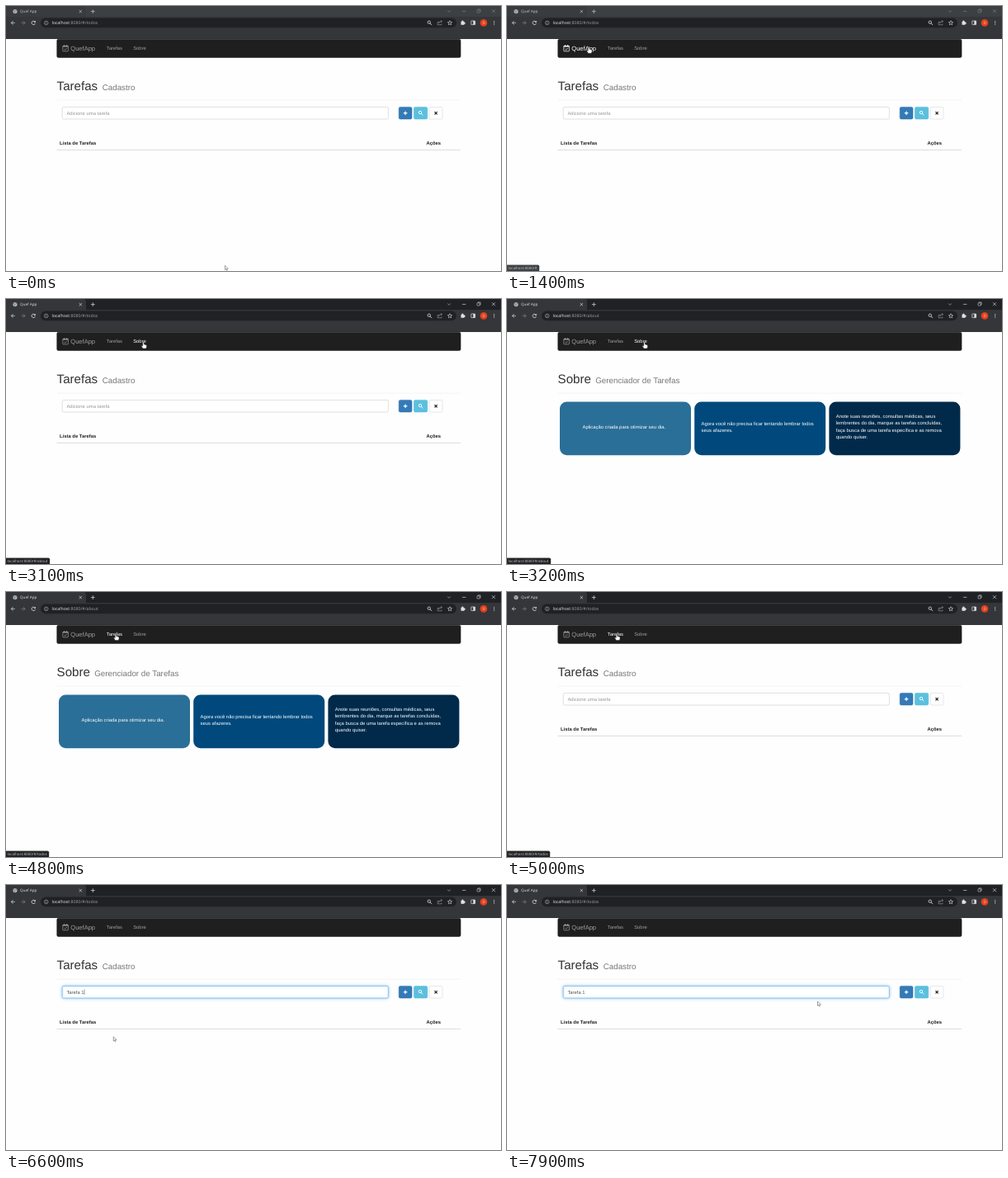
An HTML page with a canvas for the animation above (8000 ms loop, 600 px wide and 321 px high).

```html
<!DOCTYPE html>
<html lang="pt-BR">
<head>
<meta charset="utf-8">
<title>Quef App</title>
<style>
html, body { margin: 0; width: 100%; height: 100%; overflow: hidden; background: #fff; }
canvas { display: block; width: 600px; height: 321px; }
</style>
</head>
<body>
<canvas id="stage"></canvas>
<script>
const W = 600, H = 321, LOOP = 8000, STEP = 100;
const SANS = '"Liberation Sans", Arial, sans-serif';
const UI = '"Open Sans", "Noto Sans", sans-serif';
const BODY = 5.86;

const canvas = document.getElementById('stage');
const ratio = window.devicePixelRatio || 1;
canvas.width = Math.round(W * ratio);
canvas.height = Math.round(H * ratio);
const c = canvas.getContext('2d');
c.scale(ratio, ratio);
c.textRendering = 'geometricPrecision';

// Event times in ms
const FOCUS_WINDOW = 1600, OPEN_ABOUT = 3200, OPEN_TODOS = 5000;
const FOCUS_INPUT = 5630, OPEN_MENU = 5700, PICK = 6500;

// Pointer path: time, x, y
const PATH = [
  [0, 265.5, 314.3], [100, 265.5, 314.3], [500, 238, 240], [700, 238, 240],
  [1300, 99, 49.3], [1700, 99, 49.3], [2300, 166.5, 52], [3400, 166.5, 52],
  [4100, 133, 50.6], [5100, 133, 50.6], [5500, 108, 128], [5800, 108, 128],
  [6300, 121, 190], [6500, 121, 190], [6900, 180, 150], [7400, 376.5, 141], [8000, 376.5, 141]
];

const LINKS = [
  { x0: 62, x1: 115, url: 'localhost:8080/#', w: 39 },
  { x0: 116, x1: 147, url: 'localhost:8080/#/todos', w: 52 },
  { x0: 148, x1: 176, url: 'localhost:8080/#/about', w: 53 }
];
const MENU = ['2', '????', 'teste 2', 'Tarefa 1', 'Teste 2'];

const clamp = v => Math.max(0, Math.min(1, v));
const ease = v => v * v * (3 - 2 * v);

function pointerAt(t) {
  let i = 0;
  while (i < PATH.length - 2 && t >= PATH[i + 1][0]) i++;
  const [t0, x0, y0] = PATH[i], [t1, x1, y1] = PATH[i + 1];
  const k = ease(clamp((t - t0) / (t1 - t0)));
  return { x: x0 + (x1 - x0) * k, y: y0 + (y1 - y0) * k };
}

function rect(x, y, w, h, color) {
  c.fillStyle = color;
  c.fillRect(x, y, w, h);
}

function box(x, y, w, h, r, fill, stroke, lw = 0.5) {
  c.beginPath();
  c.roundRect(x, y, w, h, r);
  if (fill) { c.fillStyle = fill; c.fill(); }
  if (stroke) { c.strokeStyle = stroke; c.lineWidth = lw; c.stroke(); }
}

function text(s, x, y, size, color, family = SANS, weight = '') {
  c.font = `${weight} ${size}px ${family}`;
  c.fillStyle = color;
  c.fillText(s, x, y);
  return c.measureText(s).width;
}

function line(points, color, lw = 0.7) {
  c.beginPath();
  points.forEach(([x, y], i) => i ? c.lineTo(x, y) : c.moveTo(x, y));
  c.strokeStyle = color;
  c.lineWidth = lw;
  c.stroke();
}

function arc(x, y, r, color, lw = 0.7, a0 = 0, a1 = Math.PI * 2) {
  c.beginPath();
  c.arc(x, y, r, a0, a1);
  c.strokeStyle = color;
  c.lineWidth = lw;
  c.stroke();
}

function dot(x, y, r, color) {
  c.beginPath();
  c.arc(x, y, r, 0, Math.PI * 2);
  c.fillStyle = color;
  c.fill();
}

function cross(x, y, r, color, lw) {
  line([[x - r, y - r], [x + r, y + r]], color, lw);
  line([[x - r, y + r], [x + r, y - r]], color, lw);
}

function plus(x, y, r, color, lw) {
  line([[x - r, y], [x + r, y]], color, lw);
  line([[x, y - r], [x, y + r]], color, lw);
}

function lens(x, y, r, color, lw) {
  arc(x, y, r, color, lw);
  line([[x + r * 0.7, y + r * 0.7], [x + r * 2, y + r * 2]], color, lw);
}

function star(x, y, r, color) {
  const pts = [];
  for (let i = 0; i <= 10; i++) {
    const a = -Math.PI / 2 + i * Math.PI / 5, q = i % 2 ? r * 0.45 : r;
    pts.push([x + Math.cos(a) * q, y + Math.sin(a) * q]);
  }
  line(pts, color, 0.6);
}

function tabStrip(active) {
  rect(0, 0, W, 40, '#35363a');
  rect(0, 0, W, 13.2, active ? '#202124' : '#3c4043');
  box(-4, 0, 101, 16, [3, 3, 0, 0], active ? '#35363a' : '#393b3f');
  rect(0, 13.2, W, 14, '#35363a');

  const ink = active ? '#dfe1e5' : '#c4c7cb';
  const dim = active ? '#e8eaed' : '#85888c';
  dot(11, 6.6, 2.6, '#b4b7bb');
  line([[9, 5.6], [11, 6.4], [10.6, 8.6]], '#55585c', 0.6);
  line([[11.6, 4.5], [12.8, 6.2]], '#55585c', 0.6);
  text('Quef App', 17, 8.4, 4.6, ink, UI);
  cross(90.3, 6.6, 1.6, ink, 0.7);
  plus(105.3, 6.6, 2.4, ink, 0.7);

  line([[535.2, 5.6], [537, 7.3], [538.8, 5.6]], active ? '#bdc1c6' : dim, 0.6);
  line([[553, 6.4], [557.4, 6.4]], dim, 0.6);
  box(571, 4.8, 3.2, 3.2, 0.3, null, dim, 0.5);
  line([[572, 4.8], [572, 3.9], [575.1, 3.9], [575.1, 7], [574.2, 7]], dim, 0.5);
  cross(591, 6.2, 2, dim, 0.6);
}

function toolbar(path) {
  const ink = '#dfe1e5', dim = '#83868a';
  line([[10.8, 20.4], [6.4, 20.4]], ink);
  line([[8.6, 18.1], [6.3, 20.4], [8.6, 22.7]], ink);
  line([[18.6, 20.4], [23, 20.4]], dim);
  line([[20.8, 18.1], [23.1, 20.4], [20.8, 22.7]], dim);
  arc(33.3, 20.4, 2.2, ink, 0.8, 0.3, 5.4);
  c.beginPath();
  c.moveTo(35.8, 17.7); c.lineTo(35.8, 20); c.lineTo(33.5, 20);
  c.fillStyle = ink; c.fill();

  box(42, 14.6, 504, 11.6, 5.8, '#202124');
  arc(48.7, 20.4, 2.3, '#b6babf', 0.6);
  line([[48.7, 20.1], [48.7, 21.7]], '#b6babf', 0.6);
  dot(48.7, 19.2, 0.4, '#b6babf');
  const w = text('localhost', 55.4, 22.3, 5.2, '#e8eaed', UI);
  text(':8080/#/' + path, 55.4 + w, 22.3, 5.2, '#9aa0a6', UI);

  lens(512.8, 19.7, 1.7, ink, 0.8);
  line([[525, 19.4], [523.2, 19.4], [523.2, 22.8], [528, 22.8], [528, 21.6]], '#9da1a6', 0.6);
  line([[524.8, 21.2], [525.5, 19.2], [528.4, 18.6]], '#9da1a6', 0.6);
  line([[527, 17.2], [528.6, 18.6], [527, 20]], '#9da1a6', 0.6);
  star(538, 20.5, 2.8, ink);
  rect(551.5, 18.8, 4, 4, ink);
  dot(553.4, 18.4, 1, ink);
  dot(555.8, 20.7, 1, ink);
  box(563.8, 18, 4.8, 4.6, 0.4, null, ink, 0.7);
  rect(566.3, 18, 2.3, 4.6, ink);
  dot(579, 20.4, 4.3, '#e5401d');
  text('D', 577.4, 22.1, 4.5, '#f6dcd5', UI);
  for (const y of [18.6, 20.4, 22.2]) dot(591.7, y, 0.55, ink);
}

function calendar(color) {
  box(68.8, 48.4, 6.6, 6.4, 0.5, null, color, 0.7);
  rect(68.8, 48.2, 6.6, 1.3, color);
  line([[70.6, 47.1], [70.6, 49.2]], color, 0.9);
  line([[73.6, 47.1], [73.6, 49.2]], color, 0.9);
  line([[70.4, 52], [71.6, 53.2], [73.9, 50.8]], color, 0.8);
}

function navbar(hover) {
  const tint = i => hover === LINKS[i] ? '#fff' : '#9d9d9d';
  box(61.7, 40.2, 489.4, 22.3, 1.7, '#1f1f1f', '#0b0b0b', 0.4);
  calendar(tint(0));
  text('QuefApp', 78.3, 54, 7.54, tint(0));
  text('Tarefas', 121.8, 53.4, BODY, tint(1));
  text('Sobre', 154.2, 53.4, BODY, tint(2));
}

function heading(title, sub, subX) {
  text(title, 61.6, 102, 15.1, '#333');
  text(sub, subX, 102, 9.8, '#777');
  rect(61.5, 113.8, 489.5, 0.5, '#e9e9e9');
}

function input(t) {
  const glow = ease(clamp((t - FOCUS_INPUT) / 150));
  c.save();
  if (glow) {
    c.shadowColor = `rgba(102,175,233,${0.75 * glow})`;
    c.shadowBlur = 3.4 * ratio;
  }
  const mix = (a, b) => Math.round(a + (b - a) * glow);
  box(68.2, 122.4, 395.2, 14.6, 1.7, '#fff',
    `rgb(${mix(204, 102)},${mix(204, 175)},${mix(204, 233)})`, 0.6);
  c.restore();

  const filled = t >= PICK;
  const w = filled
    ? text('Tarefa 1', 73.4, 131.8, BODY, '#555')
    : text('Adicione uma tarefa', 73.4, 131.8, BODY, '#999');
  const blink = (t - OPEN_MENU + LOOP) % 1000 < 500;
  const caretOn = filled ? t < 7700 && (t < 6700 || t >= 7200) : blink;
  if (t >= FOCUS_INPUT && caretOn) rect(filled ? 73.6 + w : 73, 126.5, 0.5, 6.4, '#333');
}

function todosPage(t) {
  heading('Tarefas', 'Cadastro', 116.7);
  input(t);
  box(476.2, 122.4, 15.8, 14.6, 1.7, '#337ab7', '#2e6da4');
  plus(484.1, 129.7, 2.3, '#fff', 1.2);
  box(494.4, 122.4, 16.4, 14.6, 1.7, '#5bc0de', '#46b8da');
  lens(502, 129, 1.7, '#fff', 0.9);
  box(513.2, 122.4, 15.8, 14.6, 1.7, '#fff', '#ccc');
  cross(521.1, 129.8, 1.6, '#222', 1.2);
  text('Lista de Tarefas', 65, 168.4, BODY, '#222', SANS, 'bold');
  text('Ações', 509.5, 168.4, BODY, '#222', SANS, 'bold');
  rect(61.5, 173.8, 489.5, 0.9, '#d8d8d8');
}

function card(x, color, textX, baseline, lines) {
  box(x, 124.6, 159, 64.6, 8.4, color);
  lines.forEach((s, i) => text(s, textX, baseline + i * 8.45, BODY, '#fff'));
}

function aboutPage() {
  heading('Sobre', 'Gerenciador de Tarefas', 107.2);
  card(64, '#2a6f97', 91.5, 156.7, ['Aplicação criada para otimizar seu dia.']);
  card(227.2, '#01497c', 235.6, 152.5,
    ['Agora você não precisa ficar tentando lembrar todos', 'seus afazeres.']);
  card(390.4, '#012a4a', 398.8, 144, [
    'Anote suas reuniões, consultas médicas, seus',
    'lembrentes do dia, marque as tarefas concluídas,',
    'faça busca de uma tarefa específica e as remova',
    'quando quiser.'
  ]);
}

function menu(p) {
  box(106.8, 140.6, 33, 73.6, 1.6, '#292a2d');
  c.beginPath();
  c.moveTo(112, 140.8); c.lineTo(115.3, 137.4); c.lineTo(118.6, 140.8);
  c.fill();
  MENU.forEach((s, i) => {
    const y = 142.5 + i * 14;
    if (p.y >= y && p.y < y + 14) rect(106.8, y, 33, 14, '#45464a');
    text(s, 111, y + 8.8, 4.7, '#e8eaed', UI);
  });
}

function status(link, active) {
  box(-2, 313.8, link.w + 2, 10, [0, 1.5, 0, 0], active ? '#202124' : '#3c4043', '#4a4c50', 0.4);
  text(link.url, 1.4, 319.3, 4.5, '#c6c9cd', UI);
}

function pointer(p, hand) {
  c.save();
  c.translate(p.x, p.y);
  c.lineJoin = 'round';
  const shape = new Path2D(hand
    ? 'M-.8 .6Q0-.6 .8 .6V3Q1.6 2.6 2 3.3Q2.8 3 3.1 3.7Q4 3.5 4 4.5V6Q3.8 7 3.2 8H-.6Q-1.2 6.8-2.4 5.2Q-2.4 4.2-1.5 4.5L-.8 5.1Z'
    : 'M0 0V5.2L1.2 4.1L2 6L2.9 5.6L2.1 3.8H3.8Z');
  c.fillStyle = '#fff';
  c.fill(shape);
  c.strokeStyle = hand ? '#222' : '#444';
  c.lineWidth = 0.5;
  c.stroke(shape);
  c.restore();
}

function draw(t) {
  const p = pointerAt(t);
  const active = t >= FOCUS_WINDOW;
  const about = t >= OPEN_ABOUT && t < OPEN_TODOS;
  const inBar = p.y > 41 && p.y < 62;
  const hover = inBar ? LINKS.find(l => p.x >= l.x0 && p.x < l.x1) : undefined;
  const menuOpen = t >= OPEN_MENU && t < PICK;
  const inField = p.x > 68 && p.x < 463 && p.y > 122 && p.y < 137 && !about;

  rect(0, 0, W, H, '#fefefe');
  tabStrip(active);
  toolbar(about ? 'about' : 'todos');
  navbar(hover);
  if (about) aboutPage();
  else todosPage(t);
  if (menuOpen) menu(p);
  if (hover) status(hover, active);
  if (!inField) pointer(p, Boolean(hover));
}

const start = performance.now();
function tick(now) {
  const t = Math.max(0, now - start) % LOOP;
  draw(Math.floor(t / STEP) * STEP);
  requestAnimationFrame(tick);
}
draw(0);
requestAnimationFrame(tick);
</script>
</body>
</html>
```
